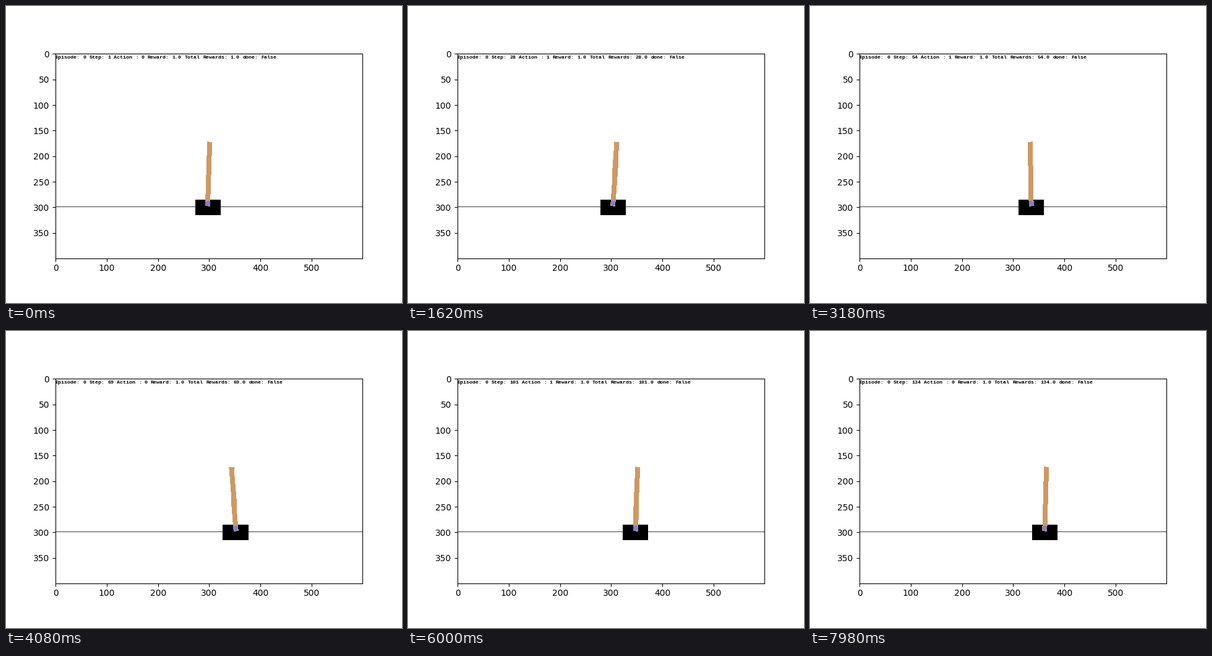
A matplotlib script that plays this animation: 640x480 px, repeating every 8000 ms.

```python
import numpy as np
import matplotlib.pyplot as plt
from matplotlib.animation import FuncAnimation

W, H = 600, 400
STEPS = 134
TAU = 0.02
SCALE = 125               # screen units per metre
TAN, PURPLE = (204, 153, 102), (128, 128, 204)

# Actions alternate left/right; at these steps the same action repeats.
REPEATS = np.array([9, 20, 29, 54, 58, 63, 72, 83, 94, 102, 109, 116, 131])


def action(n):
    return (n + 1 + int(np.sum(REPEATS <= n))) % 2


def cart_path(push, start, end):
    """Integrate the pushes twice, with the drift chosen to meet both ends."""
    vel = np.cumsum(push) * 9.756 * TAU
    x = np.concatenate([[0], np.cumsum(vel[:-1])]) * TAU * SCALE
    drift = (end - start - x[-1]) / (len(x) - 1)
    return start + x + drift * np.arange(len(x))


def pole_path(push, start, end):
    """Balanced pole: solve theta'' = k theta - c push between two end angles."""
    n = len(push)
    k, c = 15.78 * TAU**2, 14.63 * TAU**2
    m = np.diag(np.full(n, -2 - k)) + np.eye(n, k=1) + np.eye(n, k=-1)
    rhs = -c * push
    for row, value in ((0, start), (n - 1, end)):
        m[row] = 0
        m[row, row] = 1
        rhs[row] = value
    return np.linalg.solve(m, rhs)


actions = [action(n) for n in range(1, STEPS + 1)]
push = np.array([2.0 * a - 1 for a in actions])
cart_x = cart_path(push, 298.0, 362.4)
theta = pole_path(push, 0.027, 0.023)

X, Y = np.meshgrid(np.arange(W) + 0.5, H - np.arange(H) - 0.5)


def scene(cx, angle):
    img = np.full((H, W, 3), 255, np.uint8)
    img[299] = 64
    dx, dy = X - cx, Y - 107.5
    img[(abs(dx) <= 25) & (abs(Y - 100) <= 15)] = 0
    along = dx * np.sin(angle) + dy * np.cos(angle)
    across = dx * np.cos(angle) - dy * np.sin(angle)
    img[(abs(across) <= 5) & (along >= -5) & (along <= 120)] = TAN
    img[dx**2 + dy**2 <= 25] = PURPLE
    return img


def caption(n):
    return (f"Episode: 0 Step: {n} Action : {actions[n - 1]} Reward: 1.0 "
            f"Total Rewards: {n}.0 done: False").split(" ")


fig, ax = plt.subplots(figsize=(6.4, 4.8), dpi=100)
view = ax.imshow(scene(cart_x[0], theta[0]), interpolation="nearest")
words = [ax.text(0, 9, w, family="Liberation Mono", weight="bold", size=5.95,
                 color="black", va="baseline", zorder=2) for w in caption(1)]


def update(i):
    n = i // 3 + 1
    view.set_data(scene(cart_x[n - 1], theta[n - 1]))
    col = 0
    for label, word in zip(words, caption(n)):
        label.set_text(word)
        label.set_x(6 * col - 0.5)
        col += len(word) + 1
    return [view, *words]


anim = FuncAnimation(fig, update, frames=400, interval=20, repeat=True,
                     repeat_delay=0)
plt.show()
```
